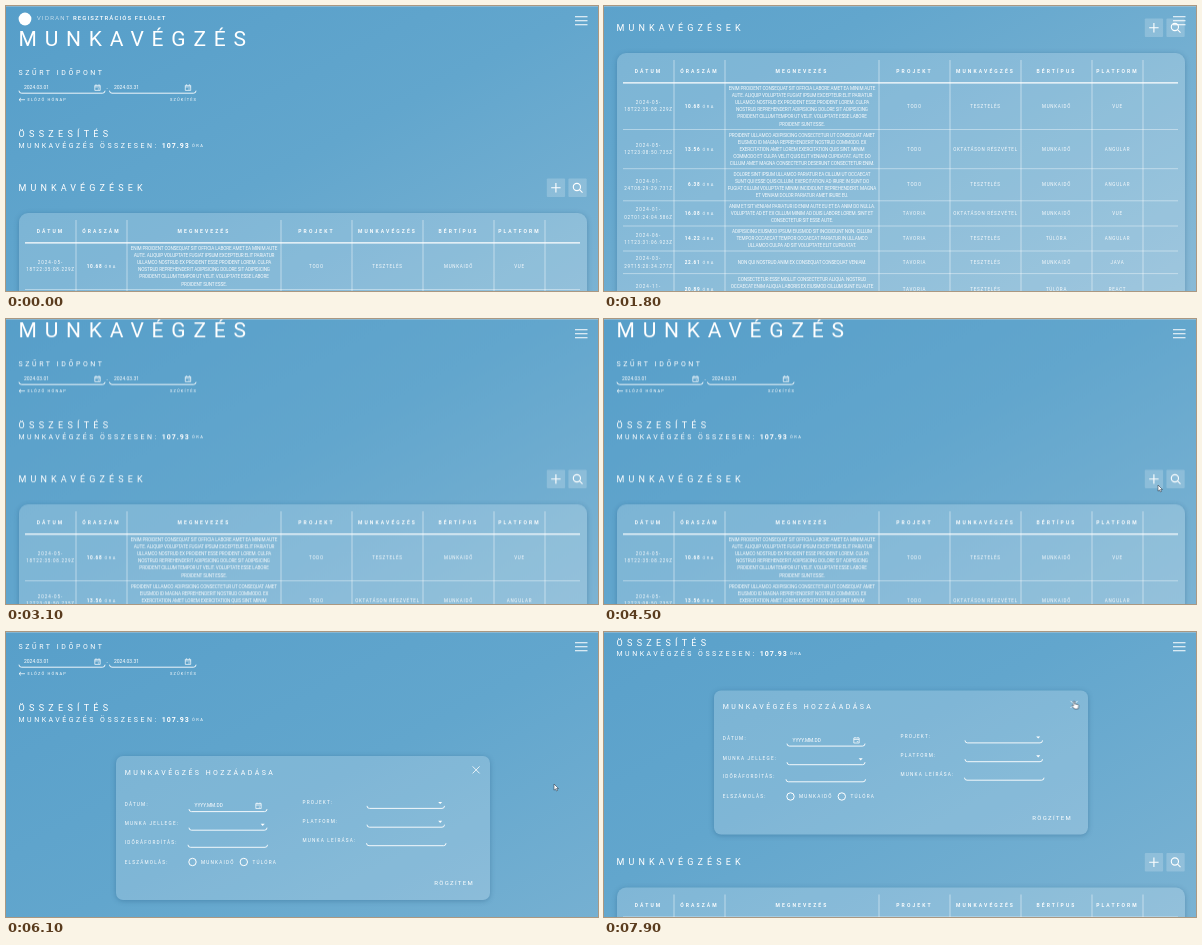
Animation, 592 px wide and 285 px high, one loop 8000 ms. Source, as an HTML page:

```html
<!DOCTYPE html>
<html lang="hu">
<head>
<meta charset="utf-8">
<title>Munkavégzés</title>
<style>
html, body { margin: 0; width: 100%; height: 100%; overflow: hidden; background: #5aa1cb; }
#stage { position: absolute; left: 0; top: 0; width: 592px; height: 285px; overflow: hidden; }
#page, #list, #modal, #cursor, .card, svg { position: absolute; left: 0; top: 0; }
svg { overflow: visible; width: 592px; height: 502px; }
text { font-family: Roboto, "Liberation Sans", sans-serif; fill: #fff; white-space: pre; }
.line { fill: none; stroke: #fff; }
#page {
  width: 592px; height: 502px;
  background: linear-gradient(152deg, #569ec9 0%, #62a6cd 38%, #8dbcd7 100%);
}
.card { background: rgba(255, 255, 255, .19); box-shadow: 0 1px 5px rgba(30, 80, 120, .35); }
#list .card { left: 12.5px; top: 207px; width: 568.5px; height: 283px; border-radius: 9px; }
#modal { width: 592px; height: 502px; transform-origin: 0 248px; }
#modal .card { left: 109.5px; top: 176px; width: 374.5px; height: 144px; border-radius: 7px; }
#edge { position: absolute; left: 0; top: 0; width: 592px; height: 1px; background: rgba(200, 215, 225, .4); }

#page, #list, #modal, #cursor, .arrow, .hand { animation: 8s step-end infinite; }
#page { animation-name: scroll, grow; }
#list { animation-name: push; }
#modal { animation-name: open; }
#cursor { animation-name: move; }
.arrow { animation-name: arrow; }
.hand { animation-name: hand; }

@keyframes scroll {
  0% { transform: translateY(0); }
  10% { transform: translateY(-12px); }
  11.25% { transform: translateY(-34px); }
  12.5% { transform: translateY(-56px); }
  13.75% { transform: translateY(-75px); }
  15% { transform: translateY(-92px); }
  16.25% { transform: translateY(-108px); }
  17.5% { transform: translateY(-122px); }
  18.75% { transform: translateY(-130px); }
  21.25% { transform: translateY(-140px); }
  22.5% { transform: translateY(-160px); }
  23.75% { transform: translateY(-182px); }
  25% { transform: translateY(-200px); }
  26.25% { transform: translateY(-212px); }
  27.5% { transform: translateY(-217px); }
  28.75% { transform: translateY(-205px); }
  30% { transform: translateY(-175px); }
  31.25% { transform: translateY(-152px); }
  35% { transform: translateY(-125px); }
  36.25% { transform: translateY(-87px); }
  37.5% { transform: translateY(-45px); }
  38.75% { transform: translateY(-21.7px); }
  62.5% { transform: translateY(-14px); }
  63.75% { transform: translateY(-5px); }
  65% { transform: translateY(0); }
  73.75% { transform: translateY(-10px); }
  75% { transform: translateY(-28px); }
  76.25% { transform: translateY(-52px); }
  77.5%, 100% { transform: translateY(-117.5px); }
}
@keyframes grow { 0% { height: 502px; } 62.5%, 100% { height: 668px; } }
@keyframes push { 0% { transform: none; } 62.5%, 100% { transform: translateY(166px); } }
@keyframes open {
  0% { transform: scaleY(0); }
  62.5% { transform: scaleY(.1); }
  63.75% { transform: scaleY(.33); }
  65% { transform: scaleY(.604); }
  66.25%, 100% { transform: none; }
}
@keyframes move {
  0% { transform: translate(620px, 260px); }
  48.75% { transform: translate(585px, 235px); }
  50% { transform: translate(583px, 222px); }
  51.25% { transform: translate(579px, 209px); }
  53.75% { transform: translate(573px, 198px); }
  55% { transform: translate(563px, 181px); }
  56.25% { transform: translate(554px, 166px); }
  57.5% { transform: translate(549.5px, 158px); }
  68.75% { transform: translate(549px, 156px); }
  70% { transform: translate(548.5px, 154px); }
  71.25% { transform: translate(548px, 152px); }
  88.75% { transform: translate(526px, 131px); }
  91.25% { transform: translate(510px, 112px); }
  92.5% { transform: translate(494px, 95px); }
  93.75% { transform: translate(481px, 81px); }
  95% { transform: translate(473px, 73px); }
  96.25%, 100% { transform: translate(469.5px, 69px); }
}
@keyframes arrow { 0% { opacity: 1; } 57.5% { opacity: 0; } 62.5% { opacity: 1; } 96.25%, 100% { opacity: 0; } }
@keyframes hand { 0% { opacity: 0; } 57.5% { opacity: 1; } 62.5% { opacity: 0; } 96.25%, 100% { opacity: 1; } }
</style>
</head>
<body>
<div id="stage">
  <div id="page">
    <svg id="head"></svg>
    <div id="list"><div class="card"></div><svg id="table"></svg></div>
    <div id="modal"><div class="card"></div><svg id="form"></svg></div>
  </div>
  <div id="edge"></div>
  <svg><path class="line" stroke-width="1.1" d="M569 10.7h12.5M569 14.7h12.5M569 18.7h12.5"/></svg>
  <div id="cursor">
    <svg>
      <path class="arrow" d="M0 0V6.2L1.5 4.9 2.5 7 3.5 6.5 2.6 4.5H4.5Z" fill="#fff" stroke="#345" stroke-width=".6"/>
      <path class="hand" d="M0 .6Q.7-.2 1.4 .6V3L4.6 3.6Q5.4 3.9 5.2 5L4.6 8H.9L-1.5 4.9Q-1.4 3.9 0 4.7Z" fill="#fff" stroke="#345" stroke-width=".6"/>
    </svg>
  </div>
</div>
<script>
const text = (x, y, s, size, gap = 0, o = {}) =>
  `<text x="${x}" y="${y + size * .36}" font-size="${size}px" letter-spacing="${gap}px" ` +
  `font-weight="${o.w || 400}" text-anchor="${o.a || 'start'}" opacity="${o.o || 1}">${s}</text>`;
const line = (d, w = .8, o = 1) => `<path class="line" d="${d}" stroke-width="${w}" opacity="${o}"/>`;
const put = (id, parts) => document.getElementById(id).innerHTML = parts.join('');

// Underline with turned-up ends
const field = (x, y, w) => line(`M${x} ${y - 2.5}q0 2.5 2.5 2.5h${w - 5}q2.5 0 2.5-2.5`, .9);
const calendar = (x, y) =>
  line(`M${x - 2.7} ${y - 2.2}h5.4v5h-5.4zM${x - 2.7} ${y - .7}h5.4M${x - 1.5} ${y - 3.2}v1M${x + 1.5} ${y - 3.2}v1M${x + .3} ${y + 1.4}h1.4`, .7);
const caret = (x, y) => `<path fill="#fff" d="M${x - 2} ${y - 1}h4l-2 2.2z"/>`;
const ring = (x, y, r, w) => `<circle class="line" cx="${x}" cy="${y}" r="${r}" stroke-width="${w}"/>`;
const button = x => `<rect x="${x}" y="172.5" width="18.3" height="18.5" rx="1" fill="#fff" opacity=".2"/>`;

put('head', [
  '<circle cx="19" cy="13" r="6.4" fill="#fff"/>',
  text(31, 12, 'VIDRANT', 6, 1.3, { w: 300 }),
  text(67, 12, 'REGISZTRÁCIÓS FELÜLET', 6, 1.1, { w: 500 }),
  text(12.5, 32.5, 'MUNKAVÉGZÉS', 21, 7.8),
  text(12.5, 66.8, 'SZŰRT IDŐPONT', 7, 2.6),
  text(18, 81.3, '2024.03.01', 5), calendar(91.5, 81.6), field(13, 87.2, 86),
  text(100.6, 82.5, '-', 5),
  text(108, 81.3, '2024.03.31', 5), calendar(182, 81.6), field(103.5, 87.2, 86.5),
  line('M19 93.7h-6m2-1.8l-2 1.8 2 1.8', .7),
  text(21.5, 93.7, 'ELŐZŐ HÓNAP', 4, 1.15),
  text(164, 93.4, 'SZŰKÍTÉS', 4, 1.15),
  text(12.5, 128, 'ÖSSZESÍTÉS', 9, 4.3),
  text(12.5, 139.2, 'MUNKAVÉGZÉS ÖSSZESEN:', 7, 2.5),
  text(155.7, 139.2, '107.93', 7, 1, { w: 700 }),
  text(186, 139.5, 'ÓRA', 4, 1.5)
]);

const edges = [19, 70, 121, 275, 346, 417, 488, 539];
const mid = i => (edges[i] + edges[i + 1]) / 2;
const cell = (i, y, s, size = 4.5, gap = .75, w = 400) => text(mid(i), y, s, size, gap, { a: 'middle', w, o: .95 });

const learn = 'OKTATÁSON RÉSZVÉTEL', test = 'TESZTELÉS', work = 'MUNKAIDŐ', extra = 'TÚLÓRA', firm = 'TAVORIA';
// bottom edge, date, time, hours, project, task, wage type, platform, description
const rows = [
  [283.5, '2024-05-', '18T22:35:08.229Z', '10.68', 'TODO', test, work, 'VUE',
    'ENIM PROIDENT CONSEQUAT SIT OFFICIA LABORE AMET EA MINIM AUTE|AUTE. ALIQUIP VOLUPTATE FUGIAT IPSUM EXCEPTEUR ELIT PARIATUR|ULLAMCO NOSTRUD EX PROIDENT ESSE PROIDENT LOREM. CULPA|NOSTRUD REPREHENDERIT ADIPISICING DOLORE SIT ADIPISICING|PROIDENT CILLUM TEMPOR UT VELIT. VOLUPTATE ESSE LABORE|PROIDENT SUNT ESSE.'],
  [322.7, '2024-05-', '12T23:08:50.735Z', '13.56', 'TODO', learn, work, 'ANGULAR',
    'PROIDENT ULLAMCO ADIPISICING CONSECTETUR UT CONSEQUAT AMET|EIUSMOD ID MAGNA REPREHENDERIT NOSTRUD COMMODO. EX|EXERCITATION AMET LOREM EXERCITATION QUIS SINT. MINIM|COMMODO ET CULPA VELIT QUIS ELIT VENIAM CUPIDATAT. AUTE DO|CILLUM AMET MAGNA CONSECTETUR DESERUNT CONSECTETUR ENIM.'],
  [354.8, '2024-01-', '24T08:29:29.731Z', '6.38', 'TODO', test, work, 'ANGULAR',
    'DOLORE SINT IPSUM ULLAMCO PARIATUR EA CILLUM UT OCCAECAT|SUNT QUI ESSE QUIS CILLUM. EXERCITATION AD IRURE IN SUNT DO|FUGIAT CILLUM VOLUPTATE MINIM INCIDIDUNT REPREHENDERIT. MAGNA|ET VENIAM DOLOR PARIATUR AMET IRURE EU.'],
  [380, '2024-01-', '02T01:24:04.586Z', '16.08', firm, learn, work, 'VUE',
    'ANIM ET SIT VENIAM PARIATUR ID ENIM AUTE EU ET EA ANIM DO NULLA.|VOLUPTATE AD ET EX CILLUM MINIM AD DUIS LABORE LOREM. SINT ET|CONSECTETUR SIT ESSE AUTE.'],
  [405, '2024-06-', '11T23:31:06.923Z', '14.22', firm, test, extra, 'ANGULAR',
    'ADIPISICING EIUSMOD IPSUM EIUSMOD SIT INCIDIDUNT NON. CILLUM|TEMPOR OCCAECAT TEMPOR OCCAECAT PARIATUR IN ULLAMCO|ULLAMCO CULPA AD SIT VOLUPTATE ELIT CUPIDATAT.'],
  [427.6, '2024-03-', '29T15:20:34.277Z', '22.61', firm, test, work, 'JAVA',
    'NON QUI NOSTRUD ANIM EX CONSEQUAT CONSEQUAT VENIAM.'],
  [460, '2024-11-', '09T01:08:07.463Z', '20.89', firm, test, extra, 'REACT',
    'CONSECTETUR ESSE MOLLIT CONSECTETUR ALIQUA. NOSTRUD|OCCAECAT ENIM ALIQUA LABORIS EX EIUSMOD CILLUM SUNT EU AUTE|PARIATUR FUGIAT. DESERUNT VELIT IN EA CULPA AUTE QUI VOLUPTATE|DOLOR EX IN PARIATUR DESERUNT AD.'],
  [482, '2024-01-', '31T01:42:35.091Z', '3.51', firm, test, work, 'ANGULAR',
    'ELIT DUIS NISI OCCAECAT DESERUNT LABORIS DESERUNT PROIDENT|MOLLIT. ADIPISICING EX ID REPREHENDERIT VOLUPTATE VELIT QUI.']
];
const titles = ['DÁTUM', 'ÓRASZÁM', 'MEGNEVEZÉS', 'PROJEKT', 'MUNKAVÉGZÉS', 'BÉRTÍPUS', 'PLATFORM'];

const cells = [
  text(12.5, 181.5, 'MUNKAVÉGZÉSEK', 9, 4.1),
  button(540.8), line('M545.2 181.8h9.4M549.9 177.1v9.4', 1.1),
  button(562.4), ring(570.9, 181, 3.6, 1.1), line('M573.5 183.6l3 3', 1.1),
  ...titles.map((s, i) => cell(i, 224.7, s, 5, 2.1, 600)),
  ...edges.slice(1).map(x => line(`M${x} 214V482`, .8, .6)),
  line('M19 236.8H574', 1.3)
];
let start = 236.8;
rows.forEach(([end, date, time, hours, project, task, wage, platform, words], n) => {
  const y = (start + end) / 2, lines = words.split('|');
  cells.push(
    cell(0, y - 3.6, date, 4.5, 1), cell(0, y + 3.6, time),
    text(96.5, y, hours, 4.7, .75, { w: 700, a: 'end' }),
    text(98.4, y, 'ÓRA', 4, 1.6, { o: .9 }),
    ...lines.map((s, i) => cell(2, y + (i - (lines.length - 1) / 2) * 7.1, s, 4.7, -.15)),
    ...[project, task, wage, platform].map((s, i) => cell(i + 3, y, s))
  );
  if (n < rows.length - 1) cells.push(line(`M19 ${end}H574`, .8, .5));
  start = end;
});
put('table', cells);

const label = (x, y, s) => text(x, y, s, 4.7, 1.2);
const select = (x, y, w) => field(x, y, w) + caret(x + w - 4.3, y - 5.5);
put('form', [
  text(118.7, 192.2, 'MUNKAVÉGZÉS HOZZÁADÁSA', 7, 2.45),
  line('M466.6 186.4l7 7m0-7l-7 7', .8),
  label(118.7, 224, 'DÁTUM:'), text(188.5, 225.5, 'YYYY.MM.DD', 4.8), calendar(252.5, 225.7), field(183, 231.6, 78),
  label(118.7, 243.8, 'MUNKA JELLEGE:'), select(183, 250.2, 78),
  label(118.7, 262.2, 'IDŐRÁFORDÍTÁS:'), field(182, 267.3, 79.5),
  label(118.7, 281.9, 'ELSZÁMOLÁS:'),
  ring(186.5, 282, 3.7, 1), label(195, 281.9, 'MUNKAIDŐ'),
  ring(237.8, 282, 3.7, 1), label(246.5, 281.9, 'TÚLÓRA'),
  label(296.5, 222.2, 'PROJEKT:'), select(361, 228.4, 77.5),
  label(296.5, 241.2, 'PLATFORM:'), select(361, 247.2, 77.5),
  label(296.5, 260, 'MUNKA LEÍRÁSA:'), field(360.5, 265.7, 79.5),
  text(428.3, 303.3, 'RÖGZÍTEM', 6, 1.3)
]);
</script>
</body>
</html>
```
